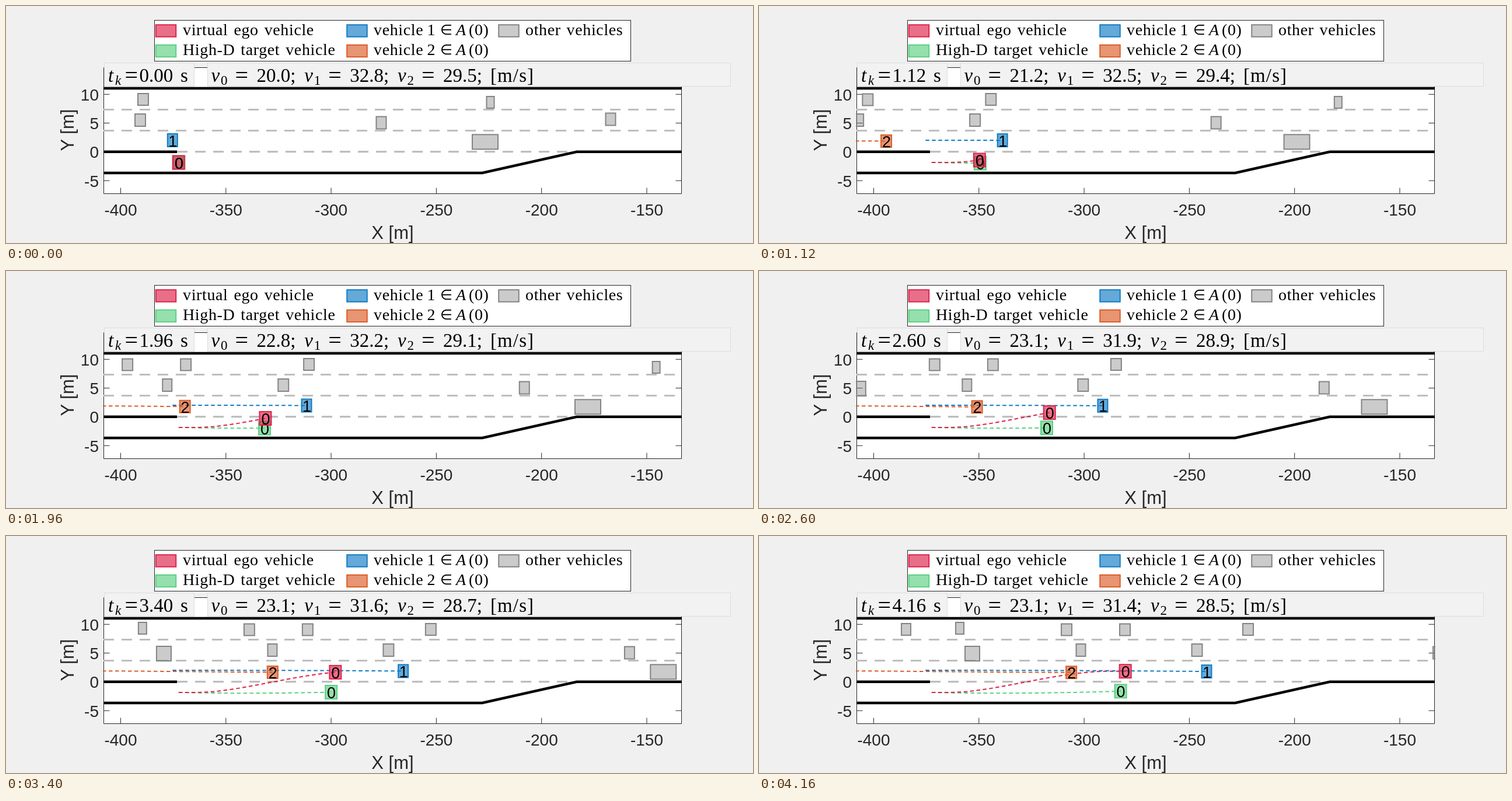
Recreate the animation shown at these times as an HTML page. Size 1280 by 406 pixels, loop 4200 ms.

```html
<!DOCTYPE html>
<html lang="en">
<head>
<meta charset="utf-8">
<title>Highway merge</title>
<style>
  html, body { margin: 0; width: 100%; height: 100%; overflow: hidden; background: #f0f0f0; }
  svg { display: block; width: 100%; height: 100%; }
  .axis { font: 28px "Liberation Sans", Arial, sans-serif; fill: #262626; }
  .axis .name { font-size: 31px; }
  .mid { text-anchor: middle; }
  .end { text-anchor: end; }
  .legend { font: 28px "Liberation Serif", serif; letter-spacing: .63px; word-spacing: 2.3px; }
  .legend .in { font-size: 24px; }
  .title { font: 33px "Liberation Serif", serif; }
  .title .sub { font-size: 23px; }
  .title .eq { font-size: 40px; }
  .title .unit { letter-spacing: 1.1px; }
  .it { font-style: italic; }
  .tag { font: 27px "Liberation Sans", Arial, sans-serif; text-anchor: middle; }
  .road { fill: none; stroke: #000; stroke-width: 4.5; }
  .lane { fill: none; stroke: #bebebe; stroke-width: 3.2; stroke-dasharray: 18 13; }
  .trail { fill: none; stroke-width: 2; stroke-dasharray: 6.5 4.5; }
  .trail, .car { clip-path: url(#plot); }
  .box { fill: #f2f2f2; stroke: #dcdcdc; }
  .frame { fill: none; stroke: #262626; }
</style>
</head>
<body>
<svg viewBox="0 0 1280 406" preserveAspectRatio="none">
  <defs><clipPath id="plot"><rect x="166" y="105" width="993" height="217"/></clipPath></defs>

  <rect x="167" y="105" width="991" height="216.5" fill="#fff"/>
  <path class="frame" d="M167.5 105.5H1157.5V321.5H167.5Z"/>
  <g id="axes" class="axis">
    <text class="name mid" x="662.5" y="398.5">X [m]</text>
    <text class="name mid" transform="translate(116 212.5) rotate(-90)">Y [m]</text>
  </g>

  <path class="lane" d="M167 177.5H1158M167 213.5H1158M293 249.7H978"/>
  <path class="road" d="M167 141H1158M167 249.7H293M167 286H816L978 249.7H1158"/>

  <g id="scene"></g>

  <rect class="box" x="168.5" y="97.5" width="154" height="40"/>
  <rect class="box" x="345.5" y="97.5" width="896" height="40"/>
  <g id="title" class="title"></g>

  <rect x="254.5" y="24.5" width="816" height="70" fill="#fff" stroke="#262626"/>
  <g id="legend" class="legend"></g>
</svg>

<script>
const STEP = 40, FRAMES = 105, PX_PER_M = 3.606;
const RED = '#de234b', GREEN = '#5cd082', BLUE = '#127cc4', ORANGE = '#da5d28', GREY = '#848484';
const el = id => document.getElementById(id);
const clamp = (v, lo, hi) => Math.min(hi, Math.max(lo, v));
const smooth = u => u * u * (3 - 2 * u);

// Speed v in m/s changes at rate a between the times from and until
const target = { tag: '0', color: GREEN, w: 20, h: 23, x: 296.5, v: 20, a: .74,
  y: t => 268 + 1.6 * t - .51 * t * t };
const ego = { tag: '0', color: RED, w: 20, h: 23, x: 295.7, v: 20, a: 1.905, from: .49, until: 2.12,
  y: t => 268 - 36.3 * smooth(clamp((t - .4) / 3.45, 0, 1)) };
const first = { tag: '1', color: BLUE, w: 17, h: 22, x: 285.3, v: 32.849, a: -.355,
  y: t => 230 + .12 * t * t };
const second = { tag: '2', color: ORANGE, w: 18, h: 21, x: 99, v: 29.54, a: -.28, from: .45,
  y: t => 231 + 2.7 * smooth(t / 4.2) };
const actors = [target, ego, first, second];

// Each lane flows at one speed; a car is [start x, y, width]
const lanes = [
  { v: 40.2, h: 20, cars: [[235, 160, 18], [830, 165, 13], [24, 160.5, 18],
    [-76, 160.5, 18], [-259, 158, 14], [-351, 160, 16]] },
  { v: 34.7, h: 21, cars: [[230, 195.5, 18], [643, 200, 17], [1036, 194, 17],
    [31, 195.5, 16], [-155, 201.5, 25]] },
  { v: 24.9, h: 25, cars: [[821, 232.8, 44]] }
];

const ramp = ({ from = 0, until = 9 }, t) => clamp(t - from, 0, until - from);
const speed = (car, t) => car.v + car.a * ramp(car, t);
function xAt(car, t) {
  const r = ramp(car, t), after = Math.max(0, t - (car.until ?? 9));
  return car.x + PX_PER_M * (car.v * t + car.a * r * (r / 2 + after));
}

const block = (x, y, w, h, color) =>
  `<rect class="car" x="${x - w / 2}" y="${y - h / 2}" width="${w}" height="${h}" fill="${color}"
    fill-opacity="${color === GREY ? .42 : .65}" stroke="${color}" stroke-width="2"/>`;

const text = (x, y, s, cls = '') => `<text x="${x}" y="${y}" class="${cls}">${s}</text>`;

function drawStatic() {
  let axes = '', ticks = '';
  for (let v = -400; v <= -150; v += 50) {
    const x = 196.5 + (v + 400) * PX_PER_M;
    ticks += `M${x} 321.5v-10`;
    axes += text(x, 359.3, v, 'mid');
  }
  for (let v = -5; v <= 10; v += 5) {
    const y = 249.9 - v * 9.86;
    ticks += `M167.5 ${y}h10M1157.5 ${y}h-10`;
    axes += text(159, y + 10.5, v, 'end');
  }
  el('axes').insertAdjacentHTML('beforeend', `<path class="frame" d="${ticks}"/>` + axes);

  const member = (n, y) => text(630, y, 'vehicle') + text(721.5, y, n) + text(744, y - 1, '∈', 'in')
    + text(771, y, 'A', 'it') + text(793, y, '(') + text(803, y, '0') + text(817.5, y, ')');
  const swatch = (x, y, color) =>
    block(x, y, 34.5, 20.5, color).replace('class="car"', '');
  el('legend').innerHTML =
    swatch(274, 42.5, RED) + text(303, 50, 'virtual ego vehicle') +
    swatch(274, 77, GREEN) + text(303, 84, 'High-D target vehicle') +
    swatch(601.5, 42.5, BLUE) + member(1, 50) +
    swatch(601.5, 77, ORANGE) + member(2, 84) +
    swatch(861.5, 42.5, GREY) + text(890, 50, 'other vehicles');
}

function drawTitle(t) {
  const base = 129.5;
  const symbol = (x, letter, sub, subX) => text(x, base, letter, 'it') + text(subX, base + 5, sub, 'sub');
  let out = symbol(175, 't', '<tspan class="it">k</tspan>', 187) + text(203.5, base + 2, '=', 'eq')
    + text(228.5, base, t.toFixed(2)) + text(299, base, 's');
  [ego, first, second].forEach((car, i) => {
    const x = 351.5 + i * 159.7;
    out += symbol(x, 'v', i, x + 16.5) + text(x + 41, base + 2, '=', 'eq')
      + text(x + 78, base, speed(car, t).toFixed(1) + ';');
  });
  el('title').innerHTML = out + text(830, base, '[m/s]', 'unit');
}

function drawScene(frame) {
  const t = frame * STEP / 1000;
  let trails = '', cars = '';
  for (const { v, h, cars: row } of lanes)
    for (const [x, y, w] of row)
      cars += block(x + v * PX_PER_M * t, y, w, Math.max(w > 30 ? 0 : w, h), GREY);
  for (const car of actors) {
    const points = Array.from({ length: frame + 1 }, (_, i) => {
      const s = i * STEP / 1000;
      return xAt(car, s).toFixed(2) + ',' + car.y(s).toFixed(2);
    });
    trails += `<polyline class="trail" stroke="${car.color}" points="${points.join(' ')}"/>`;
    const x = xAt(car, t), y = car.y(t);
    cars += block(x, y, car.w, car.h, car.color);
    if (x >= 167) cars += text(x + .5, y + 10.5, car.tag, 'tag');
  }
  el('scene').innerHTML = trails + cars;
  drawTitle(t);
}

drawStatic();
const start = performance.now();
let shown = -1;
function tick() {
  const frame = Math.floor((performance.now() - start) / STEP) % FRAMES;
  if (frame !== shown) drawScene(shown = frame);
  requestAnimationFrame(tick);
}
tick();
</script>
</body>
</html>
```
